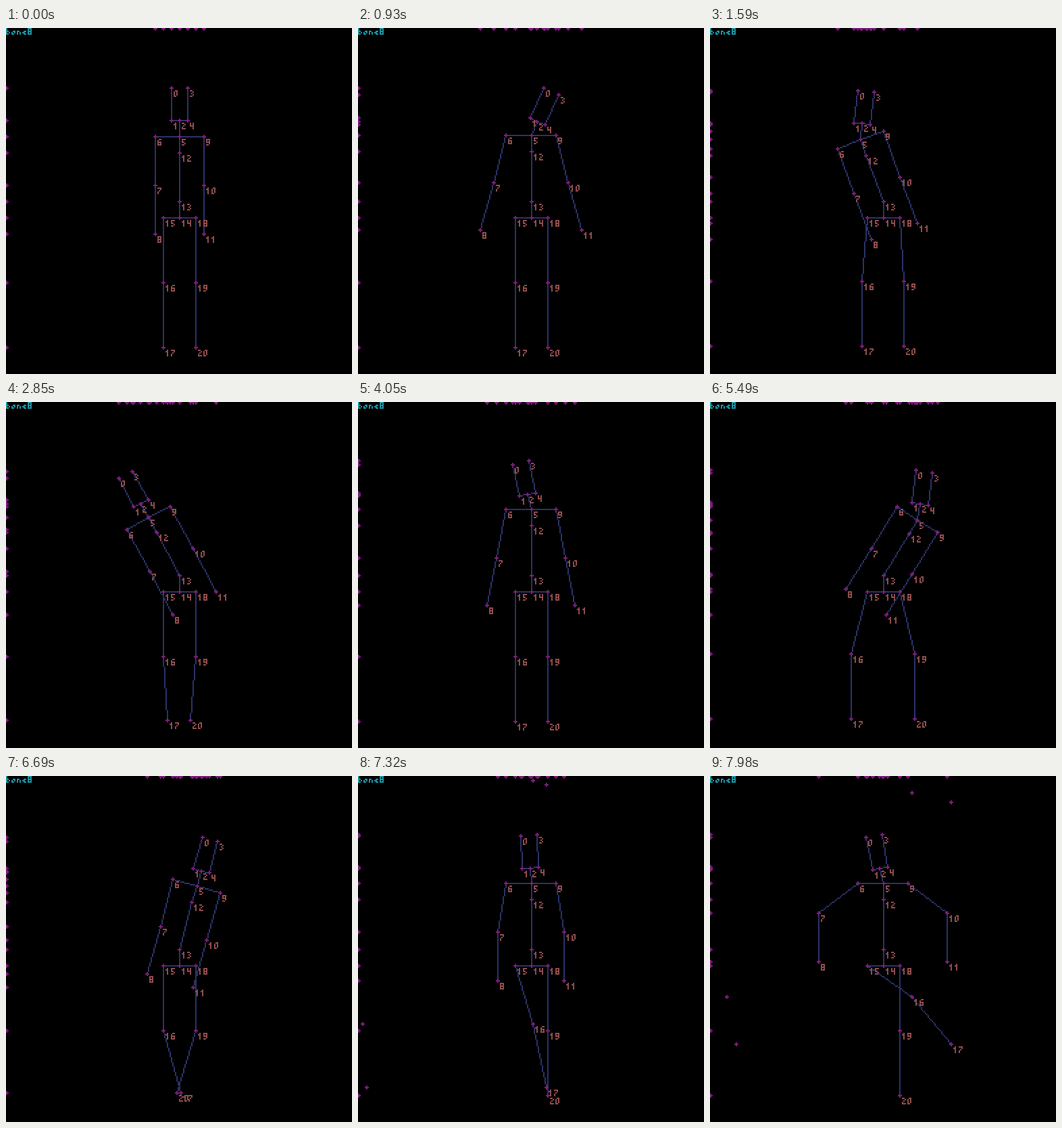
An HTML page with a canvas for the animation above (8000 ms loop, 512 by 512 pixels).

```html
<!DOCTYPE html>
<html lang="en">
<head>
<meta charset="utf-8">
<title>bone8</title>
<style>
  html, body { margin: 0; width: 100%; height: 100%; overflow: hidden; background: #000; }
  canvas { display: block; width: 100vw; height: 100vh; image-rendering: pixelated; }
</style>
</head>
<body>
<canvas id="stage" width="512" height="512" aria-label="bone8: numbered stick figure"></canvas>
<script>
const ctx = document.getElementById('stage').getContext('2d');
const LOOP = 8000, STEP = 30, CYCLE = 116, CELL = 2;
const LINE = '#2a3268', MARK = '#7b1f7b', LABEL = '#8f4c4c', TITLE = '#1c93a3';

// 3x5 glyphs, one octal digit per row
const GLYPHS = {
  0: '35556', 1: '26222', 2: '61247', 3: '61216', 4: '55711',
  5: '74616', 6: '34757', 7: '71244', 8: '75757', 9: '75716',
  b: '44656', o: '00356', n: '00655', e: '00363'
};

const CHAINS = [
  [0, 1, 2, 4, 3], [2, 5, 12, 13, 14], [8, 7, 6, 5, 9, 10, 11],
  [17, 16, 15, 14, 18, 19, 20]
];

const rad = deg => deg * Math.PI / 180;

// Rises one per step from start, holds at top, is back at zero at end
const ramp = (n, start, top, end) => Math.max(0, Math.min(n - start, top, end - n));

// Angles are measured from straight down, positive towards the right
function down([x, y, z = 0], deg, len, dz = 0) {
  return [x + len * Math.sin(rad(deg)), y + len * Math.cos(rad(deg)), z + dz];
}
const up = (p, deg, len) => down(p, 180 - deg, len);
const side = (p, deg, len) => [p[0] + len * Math.cos(rad(deg)), p[1] + len * Math.sin(rad(deg)), 0];

function angles(step) {
  const cycle = Math.floor(step / CYCLE), n = step % CYCLE;
  if (cycle === 2) {
    return { torso: 0, head: -n * 10 / 27, arm: 2 * n, fore: 0, thigh: 0, shin: 0, kick: (n / 27) ** 0.7 };
  }
  const dir = cycle ? 1 : -1;
  const torso = dir * ramp(n, 26, 32, 116);
  const arm = ramp(n, 0, 16, 42);
  return {
    torso, arm, fore: arm,
    head: torso - dir * ramp(n, 0, 26, 84),
    thigh: ramp(n, 42, 16, 74),
    shin: ramp(n, 84, 16, 116),
    kick: 0
  };
}

function pose(step) {
  const a = angles(step), p = [];
  const s = step ? 1.0001 : 1; // keeps the rounding on the upper side once moving
  p[14] = [128, 140, 0];
  p[13] = [128, 128, 0];
  p[12] = up(p[13], a.torso, 36 * s);
  p[5] = up(p[13], a.torso, 48 * s);
  p[2] = up(p[5], a.head, 12 * s);
  p[1] = side(p[2], a.head, -6 * s);
  p[4] = side(p[2], a.head, 6 * s);
  p[0] = up(p[1], a.head, 24 * s);
  p[3] = up(p[4], a.head, 24 * s);
  for (const [shoulder, hip, out] of [[6, 15, -1], [9, 18, 1]]) {
    p[shoulder] = side(p[5], a.torso, 18 * out * s);
    p[shoulder + 1] = down(p[shoulder], out * a.arm - a.torso, 36);
    p[shoulder + 2] = down(p[shoulder + 1], out * a.fore - a.torso, 36);
    const k = out < 0 ? a.kick : 0;
    p[hip] = [128 + 12 * out, 140, 0];
    p[hip + 1] = down(p[hip], out * a.thigh + 55 * k, 48 - 7 * k, 12.5 * k);
    p[hip + 2] = down(p[hip + 1], -out * a.shin + 39.6 * k, 48 - 2.5 * k, 7.3 * k);
  }
  return p.map(q => q.map(v => Math.floor(v + 1e-7)));
}

const dot = (x, y, w = 1, h = 1) => ctx.fillRect(x * CELL, y * CELL, w * CELL, h * CELL);

function cross(x, y) {
  dot(x - 1, y, 3, 1);
  dot(x, y - 1, 1, 3);
}

function line([x, y], [x1, y1]) {
  const dx = Math.abs(x1 - x), dy = -Math.abs(y1 - y);
  const sx = x < x1 ? 1 : -1, sy = y < y1 ? 1 : -1;
  let err = dx + dy;
  for (;;) {
    dot(x, y);
    if (x === x1 && y === y1) return;
    const e = 2 * err;
    if (e >= dy) { err += dy; x += sx; }
    if (e <= dx) { err += dx; y += sy; }
  }
}

function write(text, x, y) {
  [...String(text)].forEach((ch, i) => {
    [...GLYPHS[ch]].forEach((bits, row) => {
      for (let col = 0; col < 3; col++) {
        if (bits & (4 >> col)) dot(x + i * 4 + col, y + row);
      }
    });
  });
}

function draw(t) {
  const p = pose(t < 240 ? 0 : Math.floor((t - 210) / STEP));
  ctx.fillStyle = '#000';
  ctx.fillRect(0, 0, 512, 512);

  ctx.fillStyle = LINE;
  for (const chain of CHAINS) {
    for (let i = 1; i < chain.length; i++) line(p[chain[i - 1]], p[chain[i]]);
  }

  // Front view, plus the top and side projections along the edges
  ctx.fillStyle = MARK;
  for (const [x, y, z] of p) {
    cross(x, y);
    cross(x, z);
    cross(z, y);
  }

  ctx.fillStyle = LABEL;
  p.forEach(([x, y], i) => write(i, x + 2, y + 2));

  ctx.fillStyle = TITLE;
  write('bone8', 0, 0);
}

const begin = performance.now();
function tick() {
  draw((performance.now() - begin) % LOOP);
  requestAnimationFrame(tick);
}
tick();
</script>
</body>
</html>
```
